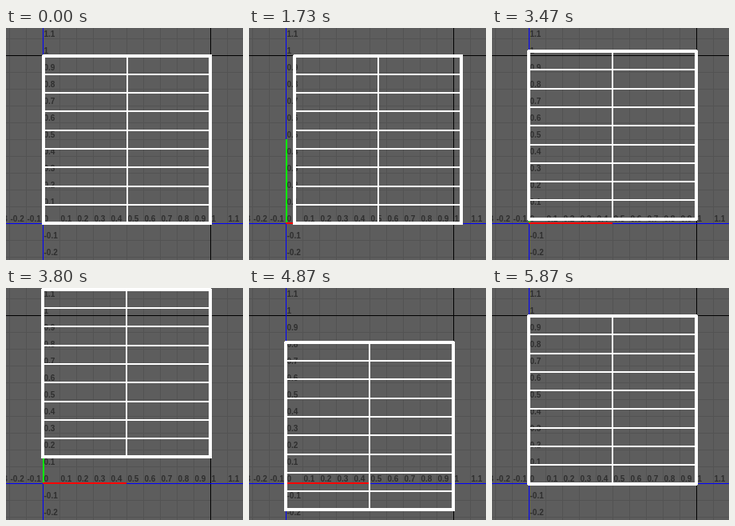
Animation of 297 by 290 pixels, one loop 6790 ms. Source, as an HTML page with a canvas:

```html
<!DOCTYPE html>
<html lang="en">
<head>
<meta charset="utf-8">
<title>UV shell moving on a grid</title>
<style>
html, body { margin: 0; width: 100%; height: 100%; overflow: hidden; background: #5d5d5d; }
canvas { display: block; }
</style>
</head>
<body>
<canvas id="stage" width="297" height="290"></canvas>
<script>
const ctx = document.getElementById('stage').getContext('2d');
const W = 297, H = 290, LOOP = 6790;
const OX = 46, OY = 244, CELL = 21;   // grid origin and spacing
const SIZE = 209.5, ROWS = 9;         // shell

const linear = p => p;
const soft = p => (p + p * p * (3 - 2 * p)) / 2;
const easeOut = p => 1 - (1 - p) * (1 - p);

// [first tick, last tick, from, to, easing]
const moveX = [
  [13, 20, 46.7, 71.5, soft],
  [23, 33, 71.5, 21.9, linear],
  [34, 35, 21.9, 21, linear],
  [37, 44, 21, 46.4, easeOut]
];
const moveY = [
  [51, 57, 34.6, 1.9, linear],
  [60, 73, 1.9, 67.9, soft],
  [77, 88, 67.9, 35, soft]
];

function valueAt(moves, tick) {
  let v = moves[0][2];
  for (const [a, b, from, to, ease] of moves) {
    if (tick > a) v = from + (to - from) * ease(Math.min(1, (tick - a) / (b - a)));
  }
  return v;
}

// 15 ticks per second, with switch times rounded to 10 ms
function tickAt(t) {
  const k = Math.floor(t * 0.015 + 0.05);
  return Math.round(k / 0.15) * 10 > t ? k - 1 : k;
}

function rect(color, x, y, w, h) {
  ctx.fillStyle = color;
  ctx.fillRect(x, y, w, h);
}

function drawGrid() {
  rect('#5d5d5d', 0, 0, W, H);
  for (let i = -2; i <= 11; i++) {
    rect('#535353', OX + i * CELL, 0, 1, H);
    rect('#535353', 0, OY - i * CELL, W, 1);
  }
  const unit = 10 * CELL;
  rect('#000', OX + unit, 0, 1, H);
  rect('#000', 0, OY - unit, W, 1);
  rect('#00f', OX, 0, 1, H);
  rect('#00f', 0, OY, W, 1);
  rect('#0f0', OX, OY - unit / 2, 2, unit / 2);
  rect('#f00', OX, OY - 1, unit / 2, 2);

  ctx.font = 'bold 10px "Liberation Sans", Arial, sans-serif';
  ctx.fillStyle = '#2e2e2e';
  for (let i = -3; i <= 11; i++) {
    const label = String(i / 10);
    ctx.fillText(label, OX + i * CELL + 1.5, OY - 2);
    if (i) ctx.fillText(label, OX + 1.5, OY - i * CELL - 2);
  }
}

function drawShell(x, y) {
  const r = Math.round, white = '#fff';
  const left = r(x), top = r(y), len = r(SIZE);
  for (let i = 1; i < ROWS; i++) {
    rect(white, left, r(y + i * SIZE / ROWS - 1), len, 2);
  }
  rect(white, r(x + SIZE / 2 - 0.8), top, 2, len);
  for (const d of [0, SIZE]) {
    rect(white, left - 1, r(y + d - 2), len + 2, 4);
    rect(white, r(x + d - 2), top - 1, 4, len + 2);
  }
}

const start = performance.now();

function draw() {
  const tick = tickAt((performance.now() - start) % LOOP);
  drawGrid();
  drawShell(valueAt(moveX, tick), valueAt(moveY, tick));
  requestAnimationFrame(draw);
}
draw();
</script>
</body>
</html>
```
